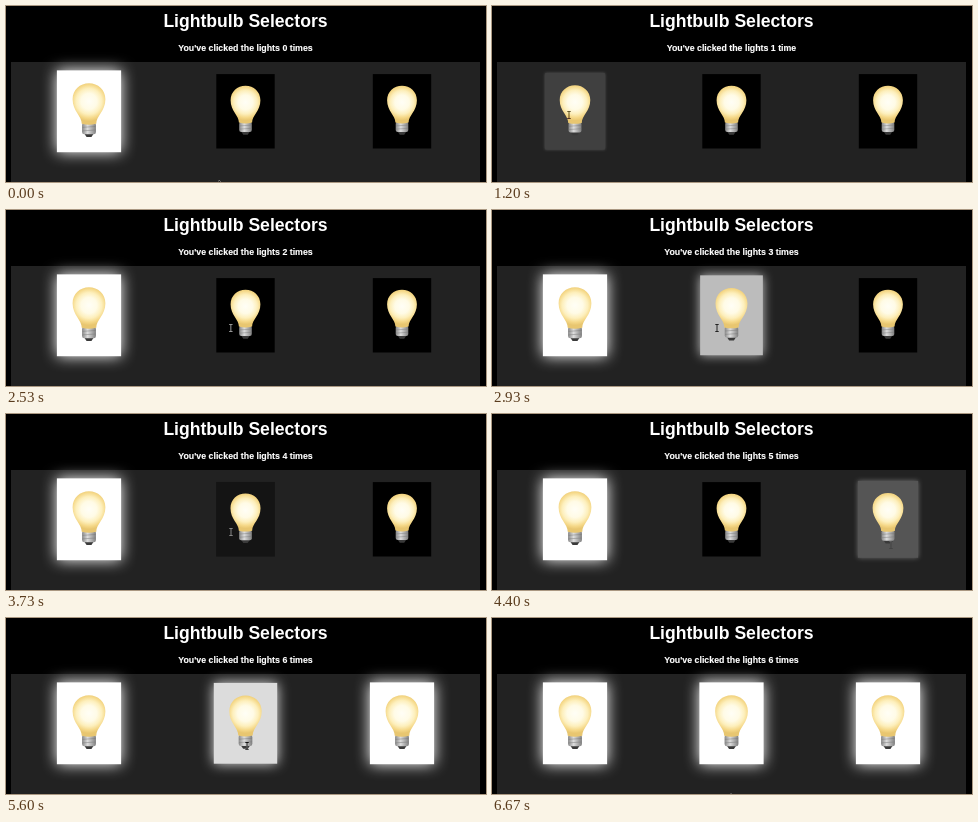
An HTML page for the animation above (6.79 s loop, 480x176 px).

```html
<!DOCTYPE html>
<html lang="en">
<head>
<meta charset="utf-8">
<title>Lightbulb Selectors</title>
<style>
  html, body { margin: 0; width: 480px; height: 176px; overflow: hidden; background: #000; }
  svg { display: block; }
  text { font: bold 8.8px "Liberation Sans", Arial, sans-serif; fill: #fff; text-anchor: middle; }
  .title { font-size: 17.6px; }
  #count { stroke: #fff; stroke-width: .15px; }
  #pointer { mix-blend-mode: difference; }
</style>
</head>
<body>
<svg width="480" height="176" viewBox="0 0 480 176">
  <defs>
    <radialGradient id="glass" gradientUnits="userSpaceOnUse" cx="0" cy="-9" r="18">
      <stop offset="0" stop-color="#fffef6"/>
      <stop offset=".4" stop-color="#fffbe6"/>
      <stop offset=".65" stop-color="#fdefbc"/>
      <stop offset=".85" stop-color="#f5d888"/>
      <stop offset="1" stop-color="#e8c670"/>
    </radialGradient>
    <linearGradient id="metal">
      <stop offset="0" stop-color="#888"/>
      <stop offset=".4" stop-color="#ddd"/>
      <stop offset="1" stop-color="#808080"/>
    </linearGradient>
    <g id="bulb">
      <path fill="#3a3a3a" d="M-4.5 20h9l-2.3 3.4h-4.4z"/>
      <rect x="-6.3" y="10.5" width="12.6" height="10.3" rx="2" fill="url(#metal)"/>
      <path stroke="#777" stroke-width=".7" opacity=".6" d="M-6 14.6l12-.8M-6 17.8l12-.8"/>
      <path fill="url(#glass)" d="M-6.6 11.3C-6.6 4-14.9 0-14.9-11C-14.9-19.6-8.2-25.5 0-25.5S14.9-19.6 14.9-11C14.9 0 6.6 4 6.6 11.3Q0 13-6.6 11.3Z"/>
    </g>
  </defs>
  <rect x="5" y="56" width="469" height="120" fill="#222"/>
  <text class="title" x="239.5" y="20.9">Lightbulb Selectors</text>
  <text id="count" x="239.5" y="45.4"></text>
  <g id="cards"></g>
  <g id="pointer">
    <path id="arrow" stroke="#ccc" stroke-width=".6" d="M0 0v8l1.9-1.8 1.2 2.9 1.3-.6-1.2-2.7h2.6z"/>
    <path id="beam" fill="none" stroke="#999" d="M-1.7-3.5h3.4M0-3.5v7M-1.7 3.5h3.4"/>
  </g>
</svg>
<script>
const LOOP = 6790, STEP = 200 / 3, LAST_STEP = 100, FADE = 300, TRAVEL = 360;
const CARD_Y = 105.3, CARD_W = 58.4, CARD_H = 74.4;
const cardX = i => 83 + 156.5 * i;

// Where the pointer goes, when it gets there and when it clicks
const visits = [
  { arrive: 0, x: 213, y: 174, clicks: [] },
  { arrive: 920, x: 77, y: 109, card: 0, clicks: [1065, 1866] },
  { arrive: 2540, x: 225, y: 118, card: 1, clicks: [2801, 3535] },
  { arrive: 4270, x: 399, y: 131, card: 2, clicks: [4335] },
  { arrive: 5300, x: 241, y: 128, card: 1, clicks: [5430] },
  { arrive: 6133, x: 239, y: 175.3, clicks: [] }
];

const $ = id => document.getElementById(id);

const box = `x="${-CARD_W / 2}" y="${-CARD_H / 2}" width="${CARD_W}" height="${CARD_H}"`;
$("cards").innerHTML =
  `<g><rect ${box} fill="#fff"/><rect ${box}/><use href="#bulb"/></g>`.repeat(3);
const cards = [...$("cards").children];

// CSS "ease": cubic-bezier(.25, .1, .25, 1)
function ease(x) {
  if (x >= 1) return 1;
  const curve = (a, b, s) => 3 * a * s * (1 - s) ** 2 + 3 * b * s * s * (1 - s) + s ** 3;
  let lo = 0, hi = 1;
  for (let i = 0; i < 24; i++) {
    const mid = (lo + hi) / 2;
    if (curve(.25, .25, mid) < x) lo = mid; else hi = mid;
  }
  return curve(.1, 1, lo);
}

// Each click toggles its card; only the first card starts lit
function lightLevel(card, t) {
  let on = card === 0 ? 1 : 0, level = on;
  for (const visit of visits.filter(v => v.card === card)) {
    for (const time of visit.clicks.filter(c => c <= t)) {
      on = 1 - on;
      level += (on - level) * ease((t - time) / FADE);
    }
  }
  return level;
}

function pointerAt(t) {
  let { x, y } = visits[0];
  for (const v of visits) {
    const u = Math.min(1, Math.max(0, (t - v.arrive) / TRAVEL + 1));
    const s = u * u * (3 - 2 * u);
    x += (v.x - x) * s;
    y += (v.y - y) * s;
  }
  return [x, y];
}

function draw(t) {
  const n = visits.flatMap(v => v.clicks).filter(c => c <= t).length;
  $("count").textContent = `You've clicked the lights ${n} time${n === 1 ? "" : "s"}`;

  cards.forEach((card, i) => {
    const k = lightLevel(i, t), [glow, face] = card.children;
    card.setAttribute("transform", `translate(${cardX(i)} ${CARD_Y}) scale(${1 + .1 * k})`);
    glow.style.filter = `blur(${7 * k}px)`;
    glow.style.opacity = k;
    face.style.fill = `hsl(0 0% ${100 * k}%)`;
  });

  const [x, y] = pointerAt(t);
  const overCard = Math.abs(y - CARD_Y) < CARD_H / 2 &&
    cards.some((_, i) => Math.abs(x - cardX(i)) < CARD_W / 2);
  $("pointer").setAttribute("transform", `translate(${x} ${y})`);
  $("beam").style.display = overCard ? "" : "none";
  $("arrow").style.display = overCard ? "none" : "";
}

const start = performance.now();
function tick() {
  const t = (performance.now() - start) % LOOP;
  // The picture advances 15 times per second
  draw(Math.min(LAST_STEP, Math.floor((t + 4) / STEP)) * STEP);
  requestAnimationFrame(tick);
}
tick();
</script>
</body>
</html>
```
